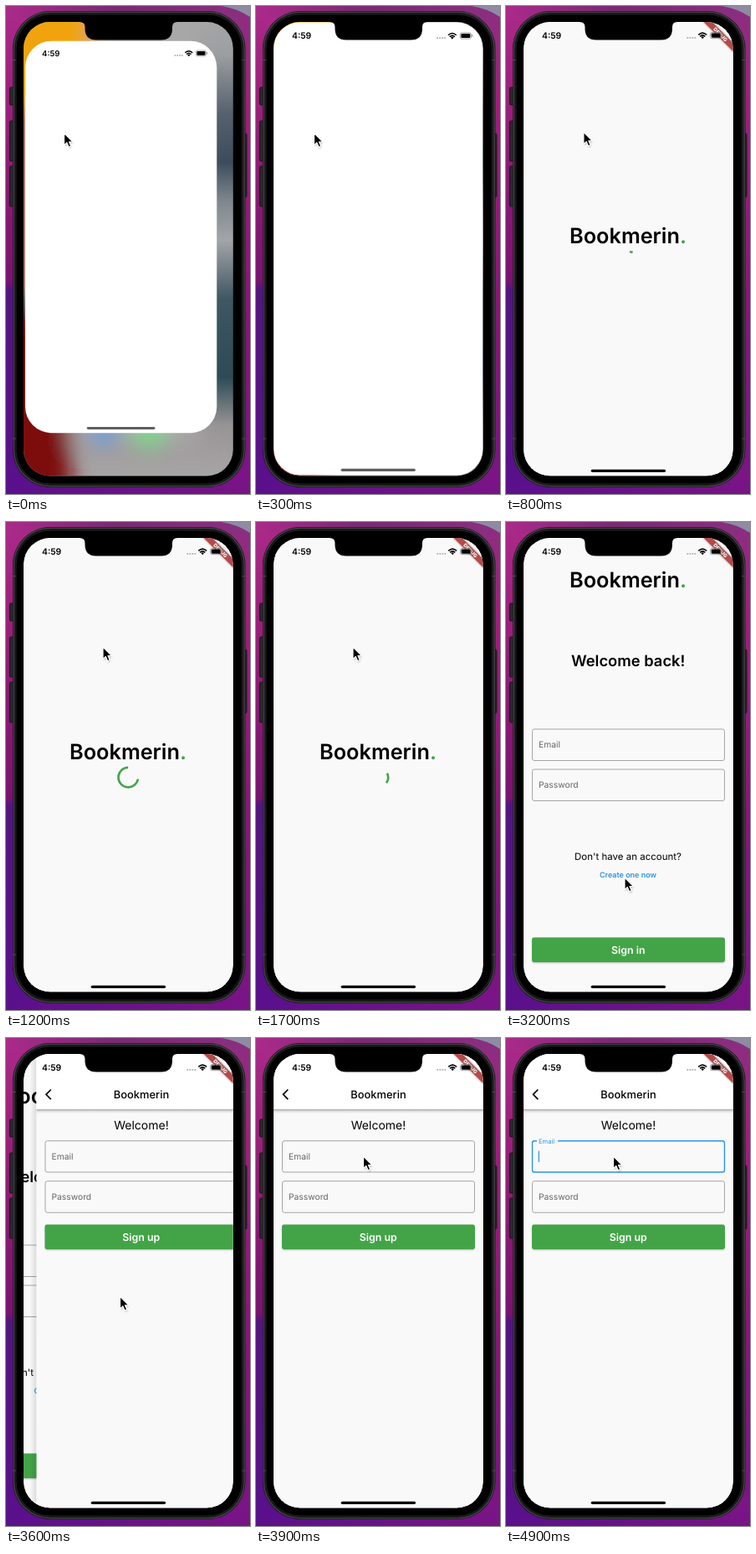
These frames come from a looping animation (292x582 px, 5000 ms). An HTML page:

```html
<!DOCTYPE html>
<html lang="en">
<head>
<meta charset="utf-8">
<title>App sign-up demo</title>
<style>
html, body { margin: 0; width: 100%; height: 100%; overflow: hidden; background: #6a1478; }
svg { display: block; width: 100vw; height: 100vh; }
text { font-family: Inter, "Noto Sans", sans-serif; text-rendering: geometricPrecision; }
.mid { text-anchor: middle; }
.semi { font-weight: 600; }
.head { font-weight: 640; }
.box { fill: none; stroke: #9b9b9b; stroke-width: .9; }
.hint { fill: #666; font-size: 10.3px; }
.btn { fill: #43a447; }
.cap { fill: #fff; font-size: 12.4px; font-weight: 640; text-anchor: middle; }
</style>
</head>
<body>
<svg viewBox="0 0 292 582" preserveAspectRatio="none">
  <defs>
    <linearGradient id="left" x2="0" y2="1">
      <stop offset="0" stop-color="#ab2a8a"/><stop offset=".15" stop-color="#a0217e"/>
      <stop offset=".35" stop-color="#8c1a74"/><stop offset=".565" stop-color="#7a1270"/>
      <stop offset=".58" stop-color="#541580"/><stop offset="1" stop-color="#5a108c"/>
    </linearGradient>
    <linearGradient id="right" x2="0" y2="1">
      <stop offset="0" stop-color="#8b2f80"/><stop offset=".2" stop-color="#a41c7f"/>
      <stop offset=".6" stop-color="#8a1579"/><stop offset="1" stop-color="#791486"/>
    </linearGradient>
    <linearGradient id="above">
      <stop offset="0" stop-color="#ab2a8a"/><stop offset=".45" stop-color="#782a72"/>
      <stop offset="1" stop-color="#8b2f80"/>
    </linearGradient>
    <linearGradient id="below">
      <stop offset="0" stop-color="#5a108c"/><stop offset="1" stop-color="#791486"/>
    </linearGradient>
    <linearGradient id="glow" x2="0" y2="1">
      <stop offset="0" stop-color="#a8a8a8"/><stop offset=".1" stop-color="#9c9ea1"/>
      <stop offset=".22" stop-color="#56616d"/><stop offset=".32" stop-color="#3c4c5c"/>
      <stop offset=".4" stop-color="#7f878e"/><stop offset=".48" stop-color="#a3a5a8"/>
      <stop offset=".6" stop-color="#3f5762"/><stop offset=".76" stop-color="#2d4a55"/>
      <stop offset=".86" stop-color="#989496"/><stop offset="1" stop-color="#aeabab"/>
    </linearGradient>
    <linearGradient id="edge">
      <stop offset="0" stop-color="#000" stop-opacity="0"/><stop offset="1" stop-color="#000" stop-opacity=".12"/>
    </linearGradient>
    <linearGradient id="drop" x2="0" y2="1">
      <stop offset="0" stop-color="#000" stop-opacity=".36"/><stop offset=".4" stop-color="#000" stop-opacity=".12"/>
      <stop offset="1" stop-color="#000" stop-opacity="0"/>
    </linearGradient>
    <filter id="blur" x="-30%" y="-30%" width="160%" height="160%"><feGaussianBlur stdDeviation="12"/></filter>
    <filter id="soft" x="-30%" y="-60%" width="160%" height="220%"><feGaussianBlur stdDeviation=".9"/></filter>
    <clipPath id="screen"><rect x="21" y="19" width="250.8" height="541.5" rx="31.500"/></clipPath>
    <clipPath id="view"><rect id="win"/></clipPath>
  </defs>

  <rect width="150" height="582" fill="url(#left)"/>
  <rect x="150" width="142" height="582" fill="url(#right)"/>
  <rect width="292" height="14" fill="url(#above)"/>
  <rect y="568" width="292" height="14" fill="url(#below)"/>
  <path d="M258 0H292V13Q277 3 258 0Z" fill="#8e8ba3"/>

  <g fill="#29292c" stroke="#111" stroke-width=".8">
    <rect x="4.4" y="97" width="6" height="21" rx="1.5"/>
    <rect x="4.4" y="137" width="6" height="48" rx="1.5"/>
    <rect x="4.4" y="191" width="6" height="48" rx="1.5"/>
    <rect x="283" y="152" width="5" height="76" rx="1.5"/>
  </g>
  <rect x="8" y="6" width="278.500" height="568" rx="45" fill="#161618"/>
  <rect x="9.400" y="7.400" width="275.700" height="565.200" rx="43.600" fill="none" stroke="#434346" stroke-width="1.400"/>
  <rect x="12" y="10" width="270.500" height="560" rx="41" fill="#000" stroke="#202022"/>
  <path d="M8 64.500h4M282.500 64.500h4M8 516h4M282.500 516h4" stroke="#4a4a4d" stroke-width="1.200"/>

  <g clip-path="url(#screen)">
    <g id="home">
      <rect x="0" y="0" width="292" height="582" fill="url(#glow)"/>
      <g filter="url(#blur)">
        <rect x="60" y="-20" width="170" height="545" fill="#a9a7a7"/>
        <rect x="-20" y="-20" width="126" height="140" fill="#f0a30c"/>
        <rect x="-20" y="120" width="90" height="230" fill="#9a7a70"/>
        <rect x="-30" y="370" width="108" height="240" fill="#7d0d10"/>
        <circle cx="117" cy="507" r="15" fill="#4d9be4"/>
        <circle cx="172" cy="508" r="20" fill="#7fd88a"/>
      </g>
    </g>

    <g clip-path="url(#view)">
      <rect x="21" y="19" width="251" height="542" fill="#fff"/>
      <g id="app">
        <rect x="21" y="19" width="251" height="542" fill="#f9f9f9"/>
        <g id="splash">
          <text class="mid head" x="146" y="283" font-size="25.300">Bookmerin<tspan fill="#43a447">.</tspan></text>
          <path id="arc" fill="none" stroke="#43a447" stroke-width="2.600"/>
        </g>
        <g id="login">
          <text class="mid head" x="146" y="78" font-size="25.300">Bookmerin<tspan fill="#43a447">.</tspan></text>
          <text class="mid head" x="146.200" y="172" font-size="18.350">Welcome back!</text>
          <rect class="box" x="31.500" y="247" width="230" height="37.500" rx="2.500"/>
          <text class="hint" x="39" y="269">Email</text>
          <rect class="box" x="31.500" y="295" width="230" height="37.500" rx="2.500"/>
          <text class="hint" x="39" y="317">Password</text>
          <text class="mid" x="146" y="402.500" font-size="11.500">Don't have an account?</text>
          <text class="mid semi" x="146" y="424" font-size="9" fill="#2d93e6">Create one now</text>
          <rect x="31.500" y="496.700" width="230" height="29" rx="2.500" opacity=".3" filter="url(#soft)"/>
          <rect class="btn" x="31" y="495.500" width="231" height="29.500" rx="2.400"/>
          <text class="cap" x="146.300" y="514.700">Sign in</text>
        </g>
        <g id="signup">
          <rect x="13" y="19" width="8" height="542" fill="url(#edge)"/>
          <rect x="21" y="19" width="251" height="542" fill="#f9f9f9"/>
          <rect x="21" y="85" width="251" height="5" fill="url(#drop)"/>
          <rect x="21" y="19" width="251" height="66" fill="#fff"/>
          <path d="M38.300 61.500L32.500 67.300L38.300 73.100" fill="none" stroke="#000" stroke-width="1.700"/>
          <text class="mid" x="146.500" y="72" font-size="12.900" font-weight="550">Bookmerin</text>
          <text class="mid" x="146.500" y="109" font-size="14">Welcome!</text>
          <rect class="box" id="field" x="31.500" y="122.700" width="230" height="37.300" rx="2.500"/>
          <rect id="gap" x="37" y="121" height="4" fill="#f9f9f9"/>
          <text class="hint" id="label" x="39">Email</text>
          <rect id="caret" x="38.700" y="134.700" width="1.200" height="13.300" fill="#2d93e6"/>
          <rect class="box" x="31.500" y="170.700" width="230" height="37.500" rx="2.500"/>
          <text class="hint" x="39" y="193">Password</text>
          <rect x="31.500" y="223.700" width="230" height="29" rx="2.500" opacity=".3" filter="url(#soft)"/>
          <rect class="btn" x="31" y="222.500" width="231" height="29.500" rx="2.400"/>
          <text class="cap" x="146.300" y="241.800">Sign up</text>
        </g>
        <g transform="translate(271.500 19) rotate(45)">
          <rect x="-30" y="17.600" width="60" height="7" opacity=".5" filter="url(#soft)"/>
          <rect x="-30" y="17.600" width="60" height="7" fill="#b94848"/>
          <text class="mid" y="23.300" font-size="6" font-weight="800" fill="#fff">DEBUG</text>
        </g>
      </g>
      <g id="status">
        <text class="semi" x="43" y="38.800" font-size="10.400">4:59</text>
        <path d="M216.500 37.800h11" stroke="#aaa" stroke-width="1.700" stroke-dasharray="1.700 1.300"/>
        <g fill="none" stroke="#000" stroke-width="1.600">
          <path d="M230.300 34.400Q235.200 29.800 240.100 34.400M232.100 36.300Q235.200 33.500 238.300 36.300"/>
          <path d="M233.300 37L235.200 39.300L237.100 37Q235.200 35.700 233.300 37Z" fill="#000" stroke="none"/>
          <rect x="244.600" y="31.500" width="13.200" height="7.200" rx="2" stroke="#777" stroke-width=".7"/>
          <rect x="245.700" y="32.500" width="11" height="5.200" rx="1.100" fill="#000" stroke="none"/>
          <path d="M259.300 34v2.200" stroke="#777" stroke-width="1"/>
        </g>
      </g>
      <rect id="bar" x="-44.700" y="-1.600" width="89.400" height="3.200" rx="1.600"/>
    </g>
    <path d="M88 18H205V19Q199 19 199 25V27Q199 40.500 185.500 40.500H108Q94.500 40.500 94.500 27V25Q94.500 19 88 19Z" fill="#000"/>
  </g>

  <g id="mouse">
    <path d="M.8 1.500V16.200L4 13.200L6.300 18.400L9 17.200L6.800 12.200H11.300Z" opacity=".25" filter="url(#soft)"/>
    <path d="M0 0V14.600L3.300 11.500L5.600 16.700L8.200 15.500L6 10.500H10.500Z" fill="#000" stroke="#fff" stroke-width="1.200" stroke-linejoin="round"/>
  </g>
</svg>
<script>
const LOOP = 5000, SPLASH = 700, LOGIN = 1900, PUSH = 3330, FOCUS = 4300;
const el = {};
document.querySelectorAll('[id]').forEach(n => el[n.id] = n);

const clamp = v => Math.min(1, Math.max(0, v));
const lerp = (a, b, p) => a + (b - a) * p;
const span = (t, from, ms) => clamp((t - from) / ms);
const show = (node, on) => node.style.display = on ? '' : 'none';
const set = (node, attrs) => { for (const k in attrs) node.setAttribute(k, attrs[k]); };

// CSS-style cubic-bezier easing, solved by bisection
function bezier(x1, y1, x2, y2) {
  const at = (a, b, u) => 3 * a * u * (1 - u) ** 2 + 3 * b * u * u * (1 - u) + u ** 3;
  return x => {
    if (x <= 0 || x >= 1) return clamp(x);
    let lo = 0, hi = 1;
    for (let i = 0; i < 24; i++) {
      const m = (lo + hi) / 2;
      if (at(x1, x2, m) < x) lo = m; else hi = m;
    }
    return at(y1, y2, lo);
  };
}
const standard = bezier(.4, 0, .2, 1);
const slide = bezier(.35, .91, .33, .97);
const glide = bezier(.42, 0, .58, 1);

// start, duration, x, y of each pointer move
const moves = [[500, 600, 116, 149], [1850, 300, 118.5, 165], [2250, 700, 142, 424], [3400, 450, 128.5, 141]];

function pointer(t) {
  let x = 69.5, y = 151.5;
  for (const [from, ms, tx, ty] of moves) {
    const p = glide(span(t, from, ms));
    x = lerp(x, tx, p);
    y = lerp(y, ty, p);
  }
  set(el.mouse, { transform: `translate(${x} ${y})` });
}

function launch(t) {
  const p = t < 600 ? 1 - Math.exp(-t / 75) : 1;
  const x = lerp(23, 21, p), y = lerp(42, 19, p), w = lerp(229, 250.8, p), h = lerp(466.5, 541.5, p);
  const s = w / 250.8;
  set(el.win, { x, y, width: w, height: h, rx: 31.5 });
  set(el.status, { transform: `translate(${x} ${y}) scale(${s}) translate(-21 -19)` });
  set(el.bar, {
    transform: `translate(${x + w / 2} ${y + h - 6.2 * s}) scale(${s})`,
    fill: t < SPLASH ? '#606060' : '#000'
  });
  show(el.home, p < 1);
}

function spinner(t) {
  const ms = Math.max(0, t - SPLASH), u = ms / 1333 % 1;
  const head = standard(clamp(u * 2)) * 270, tail = standard(clamp(u * 2 - 1)) * 270;
  const from = -105 + tail + ms / 2222 * 360 + u * 90;
  const sweep = Math.max(head - tail, 1);
  const point = deg => {
    const a = deg * Math.PI / 180;
    return `${146.3 + 11.8 * Math.cos(a)} ${304.6 + 11.8 * Math.sin(a)}`;
  };
  set(el.arc, { d: `M${point(from)}A11.8 11.8 0 ${sweep > 180 ? 1 : 0} 1 ${point(from + sweep)}` });
}

function pages(t) {
  const p = slide(span(t, PUSH, 500));
  show(el.app, t >= SPLASH);
  show(el.splash, t < LOGIN);
  show(el.login, t >= LOGIN && p < 1);
  show(el.signup, p > 0);
  set(el.login, { transform: `translate(${-83.5 * p} 0)` });
  set(el.signup, { transform: `translate(${250.5 * (1 - p)} 0)` });
}

function focus(t) {
  const p = standard(span(t, FOCUS, 200));
  const mix = (a, b) => Math.round(lerp(a, b, p));
  el.field.style.stroke = `rgb(${mix(155, 45)},${mix(155, 147)},${mix(155, 230)})`;
  el.field.style.strokeWidth = lerp(.9, 1.4, p);
  el.label.style.fill = `rgb(${mix(102, 45)},${mix(102, 147)},${mix(102, 230)})`;
  el.label.style.fontSize = lerp(10.3, 7.6, p) + 'px';
  set(el.label, { y: lerp(145, 125.5, p) });
  set(el.gap, { width: 25 * p });
  show(el.caret, t >= FOCUS);
}

function draw(t) {
  launch(t);
  spinner(t);
  pages(t);
  focus(t);
  pointer(t);
}

const began = performance.now();
function tick() {
  draw((performance.now() - began) % LOOP);
  requestAnimationFrame(tick);
}
tick();
</script>
</body>
</html>
```
